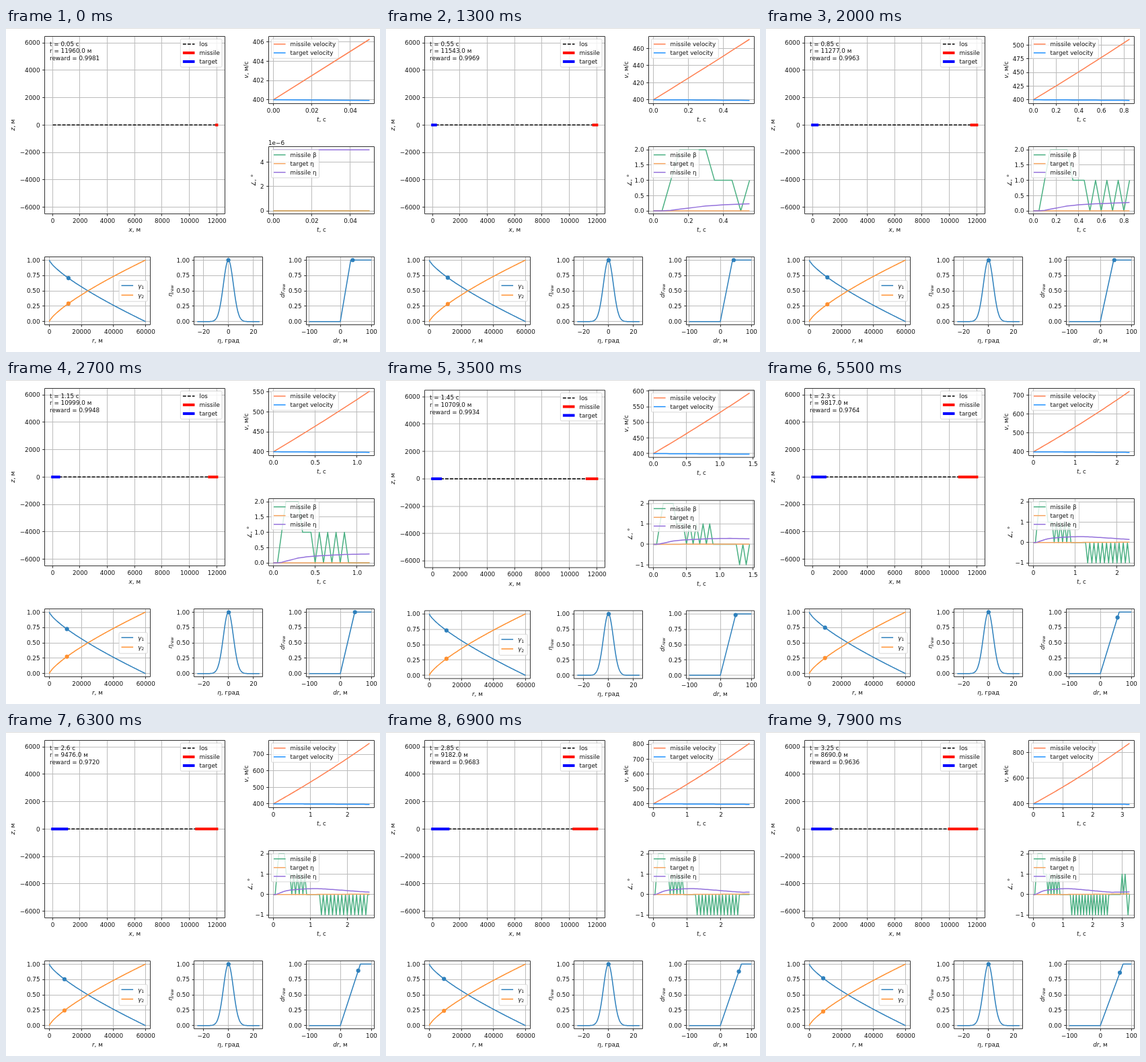
An HTML page with a canvas that plays this animation: 556x482 px, repeating every 8 s.

```html
<!DOCTYPE html>
<html lang="ru">
<head>
<meta charset="utf-8">
<style>
html, body { margin: 0; width: 100%; height: 100%; overflow: hidden; background: #fff; }
canvas { display: block; width: 556px; height: 482px; }
</style>
</head>
<body>
<canvas id="stage"></canvas>
<script>
const W = 556, H = 482, EM = 8.8, UNIT_PX = 0.88;
const LOOP = 8000, TICK = 100, DT = 0.05;
const BLUE = '#2e80bc', ORANGE = '#ff9030', GREEN = '#4bb083';
const THIN = 1.5, THICK = 4.1;
const canvas = document.getElementById('stage');
const dpr = window.devicePixelRatio || 1;
canvas.width = W * dpr;
canvas.height = H * dpr;
const ctx = canvas.getContext('2d');

const REWARD = [[0.05, 0.9981], [0.55, 0.9969], [0.85, 0.9963], [1.45, 0.9934],
  [2.3, 0.9764], [2.85, 0.9683], [3.25, 0.9636]];
const ETA = [[0.05, 0], [0.1, 0.02], [0.2, 0.09], [0.3, 0.16], [0.42, 0.205], [0.55, 0.23],
  [0.85, 0.275], [1.15, 0.29], [1.45, 0.265], [2.3, 0.15], [2.65, 0.11], [2.9, 0.115], [3.25, 0.13]];

function lerpAt(pts, t) {
  if (t <= pts[0][0]) return pts[0][1];
  for (let i = 1; i < pts.length; i++) {
    const [a, p] = pts[i - 1], [b, q] = pts[i];
    if (t <= b) return p + (q - p) * (t - a) / (b - a);
  }
  return pts[pts.length - 1][1];
}

// Model, with i counting steps of DT
const missileV = t => 400 + 125 * t + 6.1 * t * t;
const targetV = t => 400 - 1.2 * t;
const range = t => 12000 - 800 * t - t * (-3.14 + 61.4 * t + 2.09 * t * t);
const gamma2 = r => Math.pow(r / 60000, 0.76);
const bell = a => Math.exp(-a * a / 32);

function beta(i) {
  if (i < 2) return 0;
  if (i === 2) return 1;
  if (i <= 6) return 2;
  if (i <= 9) return 1;
  if (i <= 18) return i % 2;
  if (i >= 26 && i <= 50) return i % 2 - 1;
  if (i === 60 || i === 62) return 1;
  return i === 64 ? -1 : 0;
}

// Text
function font(size, italic) {
  ctx.font = (italic ? 'italic ' : '') + size + 'px "DejaVu Sans", sans-serif';
}

function text(s, x, y, align = 'left') {
  font(EM);
  ctx.fillStyle = '#111';
  ctx.textAlign = align;
  ctx.fillText(s, x, y + 3.3);
}

// *x* is italic, ~x~ is a subscript
function rich(s, x, y, { angle = 0, align = 'center' } = {}) {
  const runs = s.split(/(\*[^*]+\*|~[^~]+~)/).filter(Boolean).map(part => {
    const sub = part[0] === '~', it = part[0] === '*';
    const str = sub || it ? part.slice(1, -1) : part;
    const size = sub ? EM * 0.7 : EM;
    const slant = it || (sub && /[a-z]/.test(str));
    font(size, slant);
    return { str, size, slant, dy: sub ? 1.6 : 0, w: ctx.measureText(str).width };
  });
  const total = runs.reduce((sum, r) => sum + r.w, 0);
  ctx.save();
  ctx.translate(x, y);
  ctx.rotate(angle);
  ctx.fillStyle = '#111';
  ctx.textAlign = 'left';
  let at = align === 'center' ? -total / 2 : 0;
  for (const r of runs) {
    font(r.size, r.slant);
    ctx.fillText(r.str, at, 3.3 + r.dy);
    at += r.w;
  }
  ctx.restore();
}

// Axes
function ticksFor(lo, hi) {
  const raw = (hi - lo) / 5;
  const mag = Math.pow(10, Math.floor(Math.log10(raw)));
  const step = mag * [1, 2, 2.5, 5, 10].find(s => s * mag >= raw - 1e-9);
  const at = [];
  for (let i = Math.ceil(lo / step - 1e-9); i * step <= hi + 1e-9; i++) at.push(i * step);
  return { at, digits: digitsOf(step) };
}

function digitsOf(step) {
  let d = 0;
  while (d < 5 && Math.abs(step * 10 ** d - Math.round(step * 10 ** d)) > 1e-6) d++;
  return d;
}

const every = (from, to, step) => {
  const at = [];
  for (let v = from; v <= to + step / 1e3; v += step) at.push(v);
  return { at, digits: digitsOf(step) };
};

const format = (v, d) => v.toFixed(d).replace(/^-(?=0*\.?0*$)/, '').replace('-', '\u2212');

function seg(x1, y1, x2, y2) {
  ctx.beginPath();
  ctx.moveTo(x1, y1);
  ctx.lineTo(x2, y2);
  ctx.stroke();
}

const snap = v => Math.floor(v) + 0.5;

// box: [left, top, right, bottom]; lim: [x0, x1, y0, y1]
function makeAxes(box, lim, xt, yt) {
  const [l, t, r, b] = box, [x0, x1, y0, y1] = lim;
  return {
    box, xt, yt,
    X: v => l + (v - x0) / (x1 - x0) * (r - l),
    Y: v => b - (v - y0) / (y1 - y0) * (b - t)
  };
}

function grid(a) {
  const [l, t, r, b] = a.box;
  ctx.lineWidth = 1;
  ctx.strokeStyle = '#bcbcbc';
  a.xt.at.forEach(v => seg(snap(a.X(v)), t, snap(a.X(v)), b));
  a.yt.at.forEach(v => seg(l, snap(a.Y(v)), r, snap(a.Y(v))));
}

function frame(a, xLabel) {
  const [l, t, r, b] = a.box;
  ctx.lineWidth = 1;
  ctx.strokeStyle = '#333';
  ctx.strokeRect(snap(l), snap(t), snap(r) - snap(l), snap(b) - snap(t));
  for (const v of a.xt.at) {
    const x = a.X(v);
    seg(snap(x), b, snap(x), b + 3.4);
    text(format(v, a.xt.digits), x + 0.3, b + 10, 'center');
  }
  for (const v of a.yt.at) {
    const y = a.Y(v);
    seg(l - 3, snap(y), l, snap(y));
    text(format(v, a.yt.digits), l - 6.7, y, 'right');
  }
  rich(xLabel, (l + r) / 2, b + 23.2);
}

function yLabel(s, x, a) {
  rich(s, x, (a.box[1] + a.box[3]) / 2, { angle: -Math.PI / 2 });
}

function plot(a, pts, color) {
  ctx.strokeStyle = color;
  ctx.lineWidth = THIN;
  ctx.lineJoin = 'round';
  ctx.beginPath();
  pts.forEach(([x, y]) => ctx.lineTo(a.X(x), a.Y(y)));
  ctx.stroke();
}

function curve(a, fn, from, to, color) {
  const pts = [];
  for (let i = 0; i <= 120; i++) {
    const x = from + (to - from) * i / 120;
    pts.push([x, fn(x)]);
  }
  plot(a, pts, color);
}

function dot(a, x, y, color) {
  ctx.fillStyle = color;
  ctx.beginPath();
  ctx.arc(a.X(x), a.Y(y), 3.1, 0, 7);
  ctx.fill();
}

// rows: [label, colour, width, dash]
function legend(x, y, w, rows, step = 13) {
  ctx.beginPath();
  ctx.roundRect(x, y, w, rows.length * step + 2.8, 1.8);
  ctx.fillStyle = 'rgba(255,255,255,0.8)';
  ctx.fill();
  ctx.strokeStyle = 'rgba(204,204,204,0.85)';
  ctx.lineWidth = 0.9;
  ctx.stroke();
  rows.forEach(([label, color, width = THIN, dash = []], i) => {
    const cy = y + 7.6 + i * step;
    ctx.strokeStyle = color;
    ctx.lineWidth = width;
    ctx.setLineDash(dash);
    seg(x + 3.5, cy, x + 21.1, cy);
    ctx.setLineDash([]);
    rich(label, x + 28.1, cy, { align: 'left' });
  });
}

const DASH = [4.9, 2.1];

function drawScene(t, k) {
  const a = makeAxes([57.2, 12.2, 325.4, 276.4], [-590, 12590, -6490, 6490],
    every(0, 12000, 2000), every(-6000, 6000, 2000));
  const r = range(t), target = 400 * t, y = a.Y(0);
  grid(a);
  ctx.strokeStyle = '#000';
  ctx.lineWidth = THIN;
  ctx.setLineDash(DASH);
  seg(a.X(target), y, a.X(target + r), y);
  ctx.setLineDash([]);
  ctx.lineCap = 'square';
  ctx.lineWidth = THICK;
  ctx.strokeStyle = '#f10';
  seg(a.X(12000), y, a.X(target + r), y);
  if (k > 0) {
    ctx.strokeStyle = '#00f';
    seg(a.X(0), y, a.X(target), y);
  }
  ctx.lineCap = 'butt';
  frame(a, '*x*, м');
  yLabel('*z*, м', 9.6, a);
  let clock = String(+t.toFixed(2));
  if (!clock.includes('.')) clock += '.0';
  text('t = ' + clock + ' с', 65, 23.5);
  text('r = ' + Math.round(r) + '.0 м', 65, 34.1);
  text('reward = ' + lerpAt(REWARD, t).toFixed(4), 65, 44.6);
  legend(259.4, 16.4, 61.6, [
    ['los', '#000', THIN, DASH], ['missile', '#f10', THICK], ['target', '#00f', THICK]
  ]);
}

const padded = (lo, hi) => [lo - (hi - lo) * 0.05, hi + (hi - lo) * 0.05];

function velocityAxes(t) {
  const xl = padded(0, t), yl = padded(targetV(t), missileV(t));
  return makeAxes([390.2, 12.2, 547.6, 112.2], [...xl, ...yl], ticksFor(...xl), ticksFor(...yl));
}

function drawVelocity(a, times) {
  grid(a);
  plot(a, times.map(t => [t, missileV(t)]), 'coral');
  plot(a, times.map(t => [t, targetV(t)]), 'dodgerblue');
  frame(a, '*t*, с');
  yLabel('*v*, м/с', 357, a);
  legend(394.5, 16.4, 99.8, [['missile velocity', 'coral'], ['target velocity', 'dodgerblue']]);
}

function drawAngles(times, t, k) {
  const tiny = k === 0;
  const b = times.map((s, i) => [s, beta(i)]);
  const te = times.map(s => [s, tiny ? 0 : 0.003 * s * s]);
  const me = times.map(s => [s, tiny ? 5 : lerpAt(ETA, s)]);
  const all = [...b, ...te, ...me].map(p => p[1]);
  const xl = padded(0, t), yl = padded(Math.min(...all), Math.max(...all));
  const a = makeAxes([390.2, 176.6, 547.6, 276.6], [...xl, ...yl], ticksFor(...xl), ticksFor(...yl));
  grid(a);
  plot(a, b, GREEN);
  plot(a, te, 'sandybrown');
  plot(a, me, 'mediumpurple');
  frame(a, '*t*, с');
  if (tiny) text('1e\u22126', 390, 171);
  font(EM);
  const wide = Math.max(...a.yt.at.map(v => ctx.measureText(format(v, a.yt.digits)).width));
  yLabel('∠, °', Math.min(368, 376 - wide), a);
  legend(394.5, 181.1, 71, [
    ['missile β', GREEN], ['target η', 'sandybrown'], ['missile η', 'mediumpurple']
  ]);
}

const UNIT = every(0, 1, 0.25);

function drawGamma(t) {
  const a = makeAxes([57.2, 340.7, 214.6, 441.3], [-3000, 63000, -0.05, 1.05],
    every(0, 60000, 20000), UNIT);
  const r = range(t), g = gamma2(r);
  grid(a);
  curve(a, x => 1 - gamma2(x), 0, 60000, BLUE);
  curve(a, gamma2, 0, 60000, ORANGE);
  dot(a, r, 1 - g, BLUE);
  dot(a, r, g, ORANGE);
  frame(a, '*r*, м');
  legend(168, 375.6, 42.2, [['*γ*~1~', BLUE], ['*γ*~2~', ORANGE]], 14.2);
}

function drawBell(t) {
  const a = makeAxes([279.7, 340.7, 381.5, 441.3], [-27.5, 27.5, -0.05, 1.05],
    every(-20, 20, 20), UNIT);
  const eta = lerpAt(ETA, t);
  grid(a);
  curve(a, bell, -25, 25, BLUE);
  dot(a, eta, bell(eta), BLUE);
  frame(a, '*η*, град');
  yLabel('*η*~rew~', 244, a);
}

function drawRamp(t) {
  const a = makeAxes([446.2, 340.7, 547.8, 441.3], [-110, 110, -0.05, 1.05],
    every(-100, 100, 100), UNIT);
  const knee = 33 + 11.4 * t + 0.3 * t * t;
  const dr = (missileV(t - DT) + targetV(t - DT)) * DT;
  grid(a);
  plot(a, [[-100, 0], [0, 0], [knee, 1], [100, 1]], BLUE);
  dot(a, dr, Math.min(1, dr / knee), BLUE);
  frame(a, '*dr*, м');
  yLabel('*dr*~rew~', 410.5, a);
}

function draw(ms) {
  const n = Math.floor((ms % LOOP) / TICK);
  const k = Math.floor(0.816 * n + 0.15);
  const t = (k + 1) * DT;
  const times = Array.from({ length: k + 2 }, (_, i) => i * DT);
  const vel = velocityAxes(t);

  // A tick label sticking out above the axes pushes the whole figure down
  const top = vel.Y(vel.yt.at[vel.yt.at.length - 1]) - 4.5;
  const push = Math.max(0, Math.round((12.2 - top) / UNIT_PX)) * UNIT_PX;

  ctx.setTransform(dpr, 0, 0, dpr, 0, 0);
  ctx.fillStyle = '#fff';
  ctx.fillRect(0, 0, W, H);
  ctx.fillStyle = '#dcdcdc';
  ctx.fillRect(0, 0, W, 1);
  ctx.translate(0, push);
  drawScene(t, k);
  drawVelocity(vel, times);
  drawAngles(times, t, k);
  drawGamma(t);
  drawBell(t);
  drawRamp(t);
}

const start = performance.now();
function loop() {
  draw(performance.now() - start);
  requestAnimationFrame(loop);
}
loop();
</script>
</body>
</html>
```
